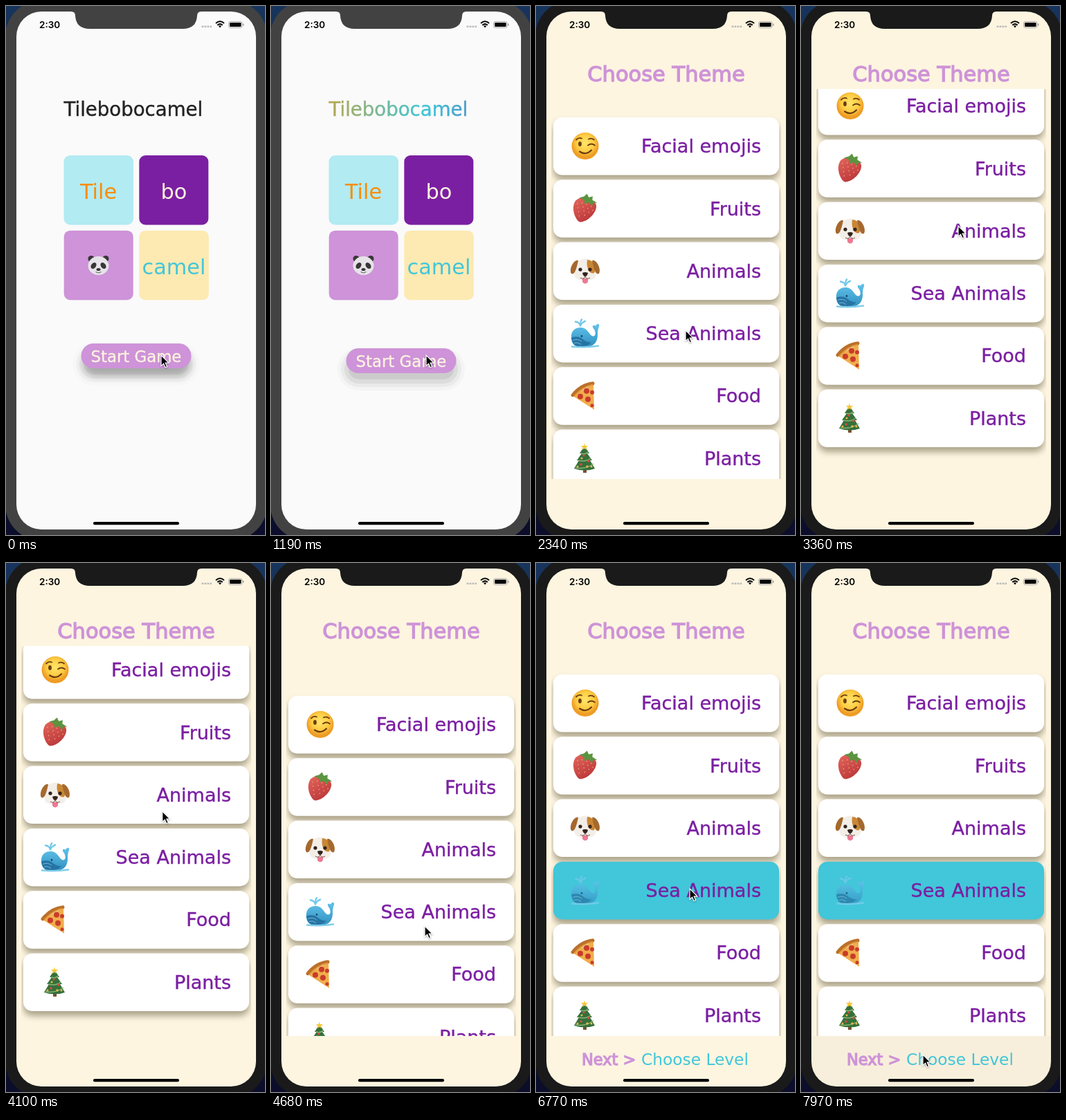
An HTML page that plays this animation: 374 by 765 pixels, repeating every 8000 ms.

```html
<!DOCTYPE html>
<html lang="en">
<head>
<meta charset="utf-8">
<title>Memory game</title>
<style>
  html, body { margin: 0; width: 100%; height: 100%; overflow: hidden; background: #101c3c; }
  svg { display: block; width: 374px; height: 765px; font-family: "DejaVu Sans", sans-serif; }
  .tile { font-size: 30.3px; text-anchor: middle; }
  .card { filter: drop-shadow(0 7px 5px rgba(60, 50, 20, .42)); }
  .label { font-size: 27px; fill: #7b1fa2; stroke: #7b1fa2; stroke-width: .4; text-anchor: end; }
  .heavy { fill: #ce93d8; stroke: #ce93d8; stroke-width: 1.3; }
</style>
</head>
<body>
<svg viewBox="0 0 374 765">
  <defs>
    <linearGradient id="sky" x2="0" y2="1"><stop stop-color="#17345c"/><stop offset="1" stop-color="#0b0d2a"/></linearGradient>
    <linearGradient id="shine" gradientUnits="userSpaceOnUse" x1="0" x2="1">
      <stop stop-color="#ff9800"/><stop offset=".333" stop-color="#3ac6d8"/>
      <stop offset=".667" stop-color="#7b1fa2"/><stop offset="1" stop-color="#222"/>
    </linearGradient>
    <radialGradient id="sun" cy=".4"><stop stop-color="#ffe56b"/><stop offset=".65" stop-color="#fdcb42"/><stop offset="1" stop-color="#ee9c25"/></radialGradient>
    <linearGradient id="berry" x2="1" y2="1"><stop stop-color="#e4685f"/><stop offset="1" stop-color="#b52f34"/></linearGradient>
    <linearGradient id="sea" x2="0" y2="1"><stop stop-color="#62c3ea"/><stop offset="1" stop-color="#2f8fc0"/></linearGradient>
    <clipPath id="screen"><rect x="15" y="8" width="346" height="749" rx="36"/></clipPath>
    <clipPath id="list"><rect x="22" y="120" width="332" height="564"/></clipPath>

    <g id="wink">
      <circle r="19.5" fill="url(#sun)"/>
      <ellipse cx="-7.5" cy="-3" rx="2.4" ry="3.4" fill="#6b3d10"/>
      <g fill="none" stroke="#6b3d10" stroke-width="1.8" stroke-linecap="round">
        <path d="M4-1Q9-5 14-1M-13-9Q-9-13-5-11M5-10Q9-12 13-9"/><path d="M-8 8Q1 14 9 6" stroke-width="2.2"/>
      </g>
    </g>
    <g id="fruit" transform="rotate(18)">
      <path d="M-17-5C-20 8-6 22-1 21C9 18 18 1 14-9C10-17-13-18-17-5Z" fill="url(#berry)"/>
      <path d="M-13-4L-4 15M-7-7L4 12M0-7L9 7M7-6L12 0" stroke="#f0b273" stroke-width="1.2" stroke-dasharray="1.5 4.5"/>
      <path d="M-13-12L-7-16L-4-21L0-17L5-20L6-15L14-13L8-11L9-6L2-10L-3-6L-5-11Z" fill="#5b9440"/>
    </g>
    <g id="dog">
      <path d="M-11-13C-5-19 5-19 11-13C16-6 18 6 13 11C8 15-8 15-13 11C-18 6-16-6-11-13Z" fill="#f3eee8"/>
      <path d="M3-16C13-16 17-4 13 3C6 6 1-5 3-16Z" fill="#c98735"/>
      <path d="M-10-15C-15-18-24-4-20 4C-15 7-12-5-10-15ZM10-15C15-18 24-4 20 4C15 7 12-5 10-15Z" fill="#a5682d"/>
      <path d="M-4 11H4V16Q0 21-4 16Z" fill="#ef7892"/>
      <g fill="#33231d"><circle cx="-7" cy="-2" r="2.6"/><circle cx="7" cy="-2" r="2.6"/><path d="M-4 3Q0 1 4 3Q3 8 0 8Q-3 8-4 3Z"/></g>
      <path d="M-7 10Q-2 13 0 8Q2 13 7 10" fill="none" stroke="#6f5144"/>
    </g>
    <g id="whale">
      <path d="M-7-11Q-8-16-14-17M-7-11Q-7-18-5-20M-7-11Q-5-16 1-18" fill="none" stroke="#74c9ea" stroke-width="2.5" stroke-linecap="round" stroke-dasharray="4 2"/>
      <path d="M-20 6C-21-6-11-10-3-8C5-6 7 5 12 4C16 3 15-2 13-6C9-10 11-13 15-11C18-15 21-14 20-10C18-6 18-2 18 4C17 15 10 20-3 20C-15 20-20 15-20 6Z" fill="url(#sea)"/>
      <path d="M-20 6Q-10 3-4 8Q2 13 9 13Q2 20-7 20Q-18 19-20 6Z" fill="#2674a4"/>
      <path d="M-18 10Q-10 7-5 12M-16 14Q-11 12-6 16" fill="none" stroke="#75b7d7"/>
      <path d="M-19 19Q0 21 19 18" fill="none" stroke="#80cdea" stroke-width="2.5" stroke-linecap="round"/>
      <circle cx="-5" cy="4" r="1.3" fill="#173d5b"/>
    </g>
    <g id="pizza">
      <path d="M-18 0L12-17L13 20Z" fill="#f0ae4c"/>
      <path d="M-18-1Q-6-16 11-18" fill="none" stroke="#bb702a" stroke-width="5" stroke-linecap="round"/>
      <path d="M-16 1Q-4-13 11-16" fill="none" stroke="#e29b3e" stroke-width="2"/>
      <g fill="#c93c2b"><circle cx="-7" cy="1" r="4"/><circle cx="2" cy="-7" r="4"/><circle cx="4" cy="5" r="4"/><circle cx="10" cy="-5" r="3"/><circle cx="10" cy="14" r="2.500"/></g>
    </g>
    <g id="tree">
      <path d="M-3 14H2V21H-3Z" fill="#78502f"/>
      <path d="M-1-18L6-7L3-7L10 3L7 3L14 15Q0 20-16 15L-9 3L-12 3L-5-7L-8-7Z" fill="#35703b"/>
      <path d="M-6-7Q1-5 4-9M-10 3Q1 6 8 0M-14 14Q2 16 12 8" fill="none" stroke="#8cb274" stroke-width="1.5"/>
      <path d="M-1-22L0-18L4-18L1-15L2-12L-1-14L-4-12L-3-15L-6-18L-2-18Z" fill="#f8c63a"/>
      <g fill="#db4b40"><circle cx="-2" cy="-4" r="1.600"/><circle cx="-6" cy="9" r="1.800"/><circle cx="5" cy="4" r="1.700"/></g>
      <g fill="#e9b94a"><circle cx="-5" cy="0" r="1.500"/><circle cx="3" cy="12" r="1.700"/><circle cx="-11" cy="12" r="1.500"/><circle cx="9" cy="12" r="1.500"/></g>
    </g>
  </defs>

  <rect width="374" height="765" fill="url(#sky)"/>
  <rect class="bezel" x="-1" y="-8" width="378" height="781" rx="52"/>

  <g clip-path="url(#screen)">
    <g id="home">
      <rect x="15" y="8" width="346" height="749" fill="#fafafa"/>
      <text x="83.500" y="159" font-size="27.600" fill="url(#shine)" stroke="url(#shine)" stroke-width=".4">Tilebobocamel</text>
      <rect x="83.500" y="216" width="100.500" height="100.500" rx="9" fill="#b2ebf2"/>
      <rect x="192.300" y="216" width="100" height="100.500" rx="9" fill="#7b1fa2"/>
      <rect x="83.700" y="324.700" width="100" height="100.500" rx="9" fill="#ce93d8"/>
      <rect x="192.300" y="324.700" width="100.500" height="100.500" rx="9" fill="#fdeab2"/>
      <g class="tile">
        <text x="133.500" y="278.500" fill="#fb8c00">Tile</text>
        <text x="242.500" y="278.500" fill="#fdf5e0">bo</text>
        <text x="242.500" y="387.500" fill="#42c6da">camel</text>
      </g>
      <g transform="translate(133.500 375.500)">
        <g fill="#383636"><circle cx="-10.500" cy="-10" r="4.500"/><circle cx="10.500" cy="-10" r="4.500"/></g>
        <ellipse rx="15" ry="13.500" fill="#e6e4e8"/>
        <g fill="#383636">
          <ellipse cx="-7" cy="0" rx="3.500" ry="5" transform="rotate(35 -7 0)"/>
          <ellipse cx="7" cy="0" rx="3.500" ry="5" transform="rotate(-35 7 0)"/>
          <ellipse cy="5.500" rx="3" ry="2"/>
        </g>
        <path d="M-4 9Q0 12 4 9" fill="none" stroke="#555"/>
      </g>
      <g id="button">
        <g id="rings"></g>
        <rect id="shade" x="112" y="499" width="153" height="36" rx="18" style="filter:blur(6px)"/>
        <rect x="108.500" y="488" width="159" height="36" rx="18" fill="#ce93d8"/>
        <text x="188" y="515" font-size="22.800" text-anchor="middle" fill="#fdf5e0" stroke="#fdf5e0" stroke-width=".3">Start Game</text>
      </g>
    </g>

    <g id="themes">
      <rect x="15" y="8" width="346" height="749" fill="#fdf5e0"/>
      <text class="heavy" x="188" y="109" font-size="30.500" text-anchor="middle">Choose Theme</text>
      <g clip-path="url(#list)"><g id="cards"></g></g>
      <rect id="pressed" x="15" y="684" width="346" height="73" fill="#000" opacity=".022"/>
      <g id="next" font-size="23.300">
        <text class="heavy" x="66" y="726" font-size="22.500">Next &gt;</text>
        <text x="152" y="726" fill="#42c6da">Choose Level</text>
      </g>
    </g>

    <path class="bezel" d="M94 8Q100 8 100 14Q101 33 121 33H255Q275 33 276 14Q276 8 282 8Z"/>
    <text x="48" y="31.500" font-size="13.500" font-weight="600" style="font-family:Inter,sans-serif">2:30</text>
    <path d="M282.500 29.800H297" stroke="#bbb" stroke-width="2.500" stroke-dasharray="2.800 1.200"/>
    <g fill="none" stroke="#000" stroke-width="2">
      <path d="M303 25Q309 19.500 315 25M305.300 27.700Q309 24.500 312.700 27.700"/>
      <path d="M307 29L309 31.500L311 29Q309 27.500 307 29Z" fill="#000" stroke="none"/>
      <rect x="321.500" y="22.500" width="19.500" height="9" rx="2.500" stroke="#aaa" stroke-width="1"/>
      <rect x="323" y="24" width="16.500" height="6" rx="1.300" fill="#000" stroke="none"/>
      <path d="M342.700 25.500V28.500" stroke="#999" stroke-width="1.300"/>
    </g>
    <rect x="126" y="746" width="124" height="4.300" rx="2"/>
  </g>

  <path id="cursor" d="M0 0V15.500L3.600 12.200L6 17.800L8.600 16.700L6.200 11.200H11Z" stroke="#fff" stroke-width="1.200" style="filter:drop-shadow(0 1px 1px rgba(0,0,0,.3))"/>
</svg>

<script>
const $ = id => document.getElementById(id);
const LOOP = 8000, TICK = 146.6;
const themes = [["wink", "Facial emojis"], ["fruit", "Fruits"], ["dog", "Animals"],
                ["whale", "Sea Animals"], ["pizza", "Food"], ["tree", "Plants"]];

$("cards").innerHTML = themes.map(([icon, name], i) => `
  <g transform="translate(0 ${161 + i * 90.3})">
    <rect class="card" id="card-${icon}" x="25" width="326" height="83.5" rx="13" fill="#fff"/>
    <use id="icon-${icon}" href="#${icon}" x="71" y="41.5"/>
    <text class="label" x="325" y="51.3">${name}</text>
  </g>`).join("");

$("rings").innerHTML = [13, 8, 3, -3].map((s, i) => `
  <rect x="${109 - s}" y="${500 - s}" width="${158 + 2 * s}" height="${36 + 2 * s}" rx="${18 + s}"
    opacity="${.022 + i * .018}"/>`).join("");

// Keyframes: [tick, value, ...]
const scrollKeys = [[16, 0], [18, -8], [21, -44], [23, -58], [24, -60], [25, -62], [27, -62],
  [28, -48], [30, 2], [31, 22], [32, 31], [33, 28], [34, 25], [35, 25], [36, 14], [40, 14], [41, 0]];
const cursorKeys = [[10, 224, 505], [16, 216, 469], [18, 218, 450], [23, 227, 318], [25, 227, 312],
  [27, 227, 312], [31, 222, 500], [32, 222, 525], [34, 221, 520], [35, 221, 520], [36, 217.5, 502],
  [40, 217.5, 502], [41, 222, 472], [42, 222, 472], [43, 222, 471], [46, 222, 471], [47, 200, 590],
  [48, 176, 695], [49, 176, 695], [50, 176, 703], [51, 176, 711]];

function at(keys, n) {
  const k = keys.findIndex(key => key[0] >= n);
  if (k === 0) return keys[0].slice(1);
  if (k < 0) return keys[keys.length - 1].slice(1);
  const a = keys[k - 1], b = keys[k], p = (n - a[0]) / (b[0] - a[0]);
  return a.slice(1).map((v, i) => v + (b[i + 1] - v) * p);
}
const move = (id, x, y) => $(id).setAttribute("transform", `translate(${x} ${y})`);
const show = (id, on) => $(id).style.display = on ? "" : "none";

function draw(ms) {
  const n = Math.floor((ms % LOOP + 12) / TICK);

  const sink = (1 - Math.cos(Math.PI * n / 8)) / 2;
  $("shine").setAttribute("x2", Math.max(.1, n / 8 * 675));
  move("button", 0, 7 * sink);
  $("shade").setAttribute("opacity", .24 * (1 - sink));
  $("rings").setAttribute("opacity", .6 + .4 * sink);

  const slide = 1 - (1 - Math.min(1, Math.max(0, (n - 9) / 4))) ** 2;
  move("home", -115 * slide, 0);
  move("themes", 346 * (1 - slide), 0);
  show("home", slide < 1);
  show("themes", slide > 0);
  document.querySelectorAll(".bezel").forEach(e => e.setAttribute("fill", n < 9 ? "#424242" : "#1a1a1a"));

  move("cards", 0, at(scrollKeys, n)[0]);
  const picked = n >= 46;
  $("card-whale").setAttribute("fill", picked ? "#42c6da" : "#fff");
  $("icon-whale").setAttribute("opacity", picked ? .75 : 1);
  show("next", picked);
  show("pressed", n >= 53);
  move("cursor", ...at(cursorKeys, n));
}

(function frame() {
  draw(performance.now());
  requestAnimationFrame(frame);
})();
</script>
</body>
</html>
```
